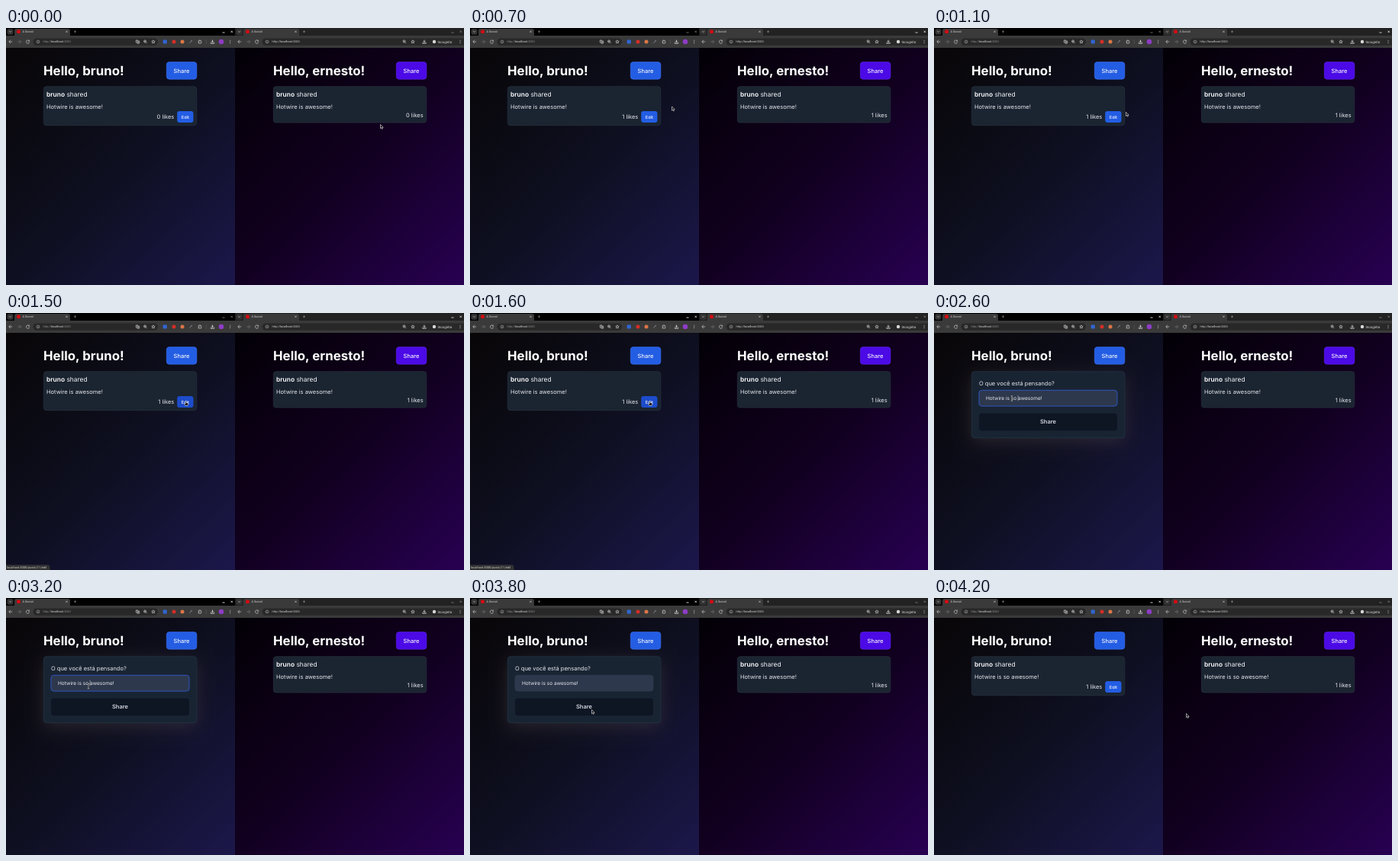
Animation of 600 by 337 pixels, one loop 4300 ms. Source, as an HTML page with a canvas:

```html
<!DOCTYPE html>
<html lang="en">
<head>
<meta charset="utf-8">
<title>Live feed in two windows</title>
<style>
html, body { margin: 0; width: 100%; height: 100%; overflow: hidden; background: #000; }
canvas { display: block; width: 600px; height: 337px; }
</style>
</head>
<body>
<canvas id="stage" width="600" height="337"></canvas>
<script>
const ctx = document.getElementById('stage').getContext('2d');
const LOOP = 4300;
const AUTHOR = 'bruno', READER = 'ernesto';
const T = { like: 300, hover: 1300, edit: 1600, form: 1700, focus: 2100, typing: 2300, blur: 3700, save: 3900 };

// Pointer path: time, x, y
const PATH = [
  [0, 490.5, 126.5], [200, 534, 115], [350, 534, 115], [700, 264.5, 103], [900, 264, 104],
  [1150, 250, 111], [1300, 235.5, 115.5], [1650, 235.5, 115.5], [2000, 102, 112],
  [3100, 102, 112], [3600, 159.5, 146.5], [3900, 159.5, 146.5], [4200, 330.5, 151.5]
];

ctx.textRendering = 'geometricPrecision';

function box(x, y, w, h, r, fill, line, width = 0.6) {
  ctx.beginPath();
  ctx.roundRect(x, y, w, h, r);
  if (fill) { ctx.fillStyle = fill; ctx.fill(); }
  if (line) { ctx.strokeStyle = line; ctx.lineWidth = width; ctx.stroke(); }
}

function dot(x, y, r, fill) {
  ctx.beginPath();
  ctx.arc(x, y, r, 0, Math.PI * 2);
  ctx.fillStyle = fill;
  ctx.fill();
}

function stroke(color, width, d, x = 0, y = 0) {
  ctx.save();
  ctx.translate(x, y);
  ctx.strokeStyle = color;
  ctx.lineWidth = width;
  ctx.stroke(new Path2D(d));
  ctx.restore();
}

// Returns the x where the text ends.
function text(str, x, y, size, color = '#f3f4f6', weight = 400, align = 'left', family = 'Inter') {
  ctx.font = `${weight} ${size}px ${family}, sans-serif`;
  ctx.textAlign = align;
  ctx.fillStyle = color;
  ctx.fillText(str, x, y);
  return x + ctx.measureText(str).width;
}

const small = (str, x, y, color, size = 3.9) => text(str, x, y, size, color, 400, 'left', 'Roboto');

const ICONS = {
  back: 'M2.2 0H-2.2M0 -2.2L-2.2 0L0 2.2',
  next: 'M-2.2 0H2.2M0 -2.2L2.2 0L0 2.2',
  reload: 'M1.7 -1.2A2.1 2.1 0 1 0 2.1 .5M2.1 -2.3V-.8H.6',
  info: 'M1.9 0A1.9 1.9 0 1 1 -1.9 0A1.9 1.9 0 1 1 1.9 0M0 -.3V1.1M0 -1.1V-.7',
  zoom: 'M1.2 -.5A1.6 1.6 0 1 1 -2 -.5A1.6 1.6 0 1 1 1.2 -.5M.8 .7L2.2 2.1M-1.2 -.5H.4M-.4 -1.3V.3',
  star: 'M0 -2.2L.6 -.7L2.2 -.6L1 .4L1.4 2L0 1.1L-1.4 2L-1 .4L-2.2 -.6L-.6 -.7Z',
  translate: 'M-2.2 -2H.3V1H-2.2ZM.3 -.8H2.2V2.2H-.6V1M-1.6 -1.1H-.3M.8 1.4L1.4 0',
  download: 'M0 -2.4V.8M-1.4 -.6L0 .8L1.4 -.6M-2.2 1V2.2H2.2V1',
  puzzle: 'M-1.9 -1.3H-.6V-2.1H.5V-1.3H1.7V2H-1.9V.9H-1.2V-.2H-1.9Z',
  pen: 'M-1.8 2L1.8 -2M.4 -1.7L1.7 -.6',
  close: 'M-1.1 -1.1L1.1 1.1M1.1 -1.1L-1.1 1.1',
  plus: 'M-1.6 0H1.6M0 -1.6V1.6',
  chevron: 'M-1.3 -.6L0 .7L1.3 -.6'
};

function icon(name, x, y, color = '#d2d2d2', width = 0.65) {
  stroke(color, width, ICONS[name], x, y);
}

function kebab(x) {
  for (const y of [16.2, 18, 19.8]) dot(x, y, 0.5, '#d0d0d0');
}

function chrome(ox, strip, active, pillEnd) {
  ctx.fillStyle = strip;
  ctx.fillRect(ox, 0, 300, 11);
  box(ox + 1.5, 1.2, 8, 7.5, 2, '#343434');
  icon('chevron', ox + 5.5, 4.8);
  box(ox + 11, 1, 73, 12, 2.5, '#3a3a3a');
  ctx.fillStyle = '#3a3a3a';
  ctx.fillRect(ox, 10, 300, 16);
  dot(ox + 16.5, 4.8, 2.5, '#d40b12');
  small('A Social', ox + 21.5, 6.2, '#dcdcdc');
  icon('close', ox + 79.5, 4.8);
  icon('plus', ox + 90.5, 4.8, '#b0b0b0', 0.5);
  const control = active ? '#f0f0f0' : '#858585';
  stroke(control, 0.8, 'M-1.6 0H1.6', ox + 285, 6);
  icon('close', ox + 295.7, 4.8, control, 0.8);

  icon('back', ox + 6, 18);
  icon('next', ox + 17.5, 18, '#777');
  icon('reload', ox + 28.5, 18);
  box(ox + 35.5, 13.4, pillEnd - 35.5, 9.4, 4.7, '#282828');
  icon('info', ox + 42, 18, '#c8c8c8', 0.5);
  const right = ox > 0;
  let x = small('http://', ox + 48.5, 19.4, right ? '#c8c8c8' : '#8c8c8c');
  x = small('localhost', x, 19.4, '#e2e2e2');
  small(':3000', x, 19.4, right ? '#c8c8c8' : '#8c8c8c');
}

function leftTools() {
  icon('translate', 172.5, 18);
  icon('zoom', 182.5, 18);
  icon('star', 193, 18);
  box(205.7, 15.5, 5, 5, 1, '#2f66d8');
  dot(220, 18, 2.5, '#d52e25');
  dot(231, 18, 2.5, '#d97746');
  icon('pen', 242, 18, '#999');
  icon('puzzle', 254, 18);
  stroke('#5a5a5a', 0.6, 'M262.3 15V21');
  icon('download', 270.5, 18, '#e6e6e6', 0.8);
  dot(282, 18, 3.3, '#8e3cc4');
  kebab(293.7);
}

function rightTools() {
  icon('zoom', 522, 18);
  icon('star', 533, 18);
  icon('download', 548, 18, '#e6e6e6', 0.8);
  box(556, 13.4, 33, 9.4, 4.7, '#292929');
  dot(561, 18, 2.2, '#d8d8d8');
  small('Incognito', 565.5, 19.5, '#e0e0e0', 4.5);
  kebab(595);
}

function backdrop(ox, colors) {
  const g = ctx.createLinearGradient(ox, 26, ox + 300, 337);
  colors.forEach((c, i) => g.addColorStop(i / (colors.length - 1), c));
  ctx.fillStyle = g;
  ctx.fillRect(ox, 26, 300, 311);
}

function header(ox, name, fill, line) {
  text(`Hello, ${name}!`, ox + 49, 62, 16.875, '#fff', 700);
  box(ox + 210.3, 44.6, 39.6, 22.6, 3.7, fill, line);
  text('Share', ox + 230, 58.7, 7.5, '#f4f5ff', 500, 'center');
}

function card(ox, height, message) {
  box(ox + 49.3, 76.7, 200.5, height, 3.7, '#1b2431', '#2d3744');
  const end = text(AUTHOR, ox + 53, 90, 8.44, '#fff', 600);
  text(' shared', end, 90, 8.44);
  text(message, ox + 53, 105.9, 7.5, '#e5e7eb');
}

function form(t, value, typed) {
  ctx.save();
  ctx.shadowColor = 'rgba(96, 84, 82, .34)';
  ctx.shadowBlur = 22;
  ctx.shadowOffsetY = 5;
  box(49.3, 76.7, 200.5, 87, 3.7, '#192433');
  ctx.restore();
  box(49.3, 76.7, 200.5, 87, 3.7, null, '#26394a');
  text('O que você está pensando?', 59, 94.6, 7.5, '#e5e7eb');

  const focused = t >= T.focus && t < T.blur;
  box(59, 101.3, 181, 20.8, 3.7, '#2d384c', focused ? '#2f55c0' : '#344156', focused ? 1 : 0.5);
  text(value, 68, 113.9, 6.56, '#e8eaef');
  if (focused && (t - T.focus) % 1000 < 600) {
    const caret = 68 + ctx.measureText('Hotwire is ' + typed).width;
    stroke('#e8eaef', 0.5, 'M0 108V115.2', caret);
  }
  box(59, 131.4, 181, 22.8, 3.7, '#0e1523');
  text('Share', 149.5, 145.3, 7.5, '#d5d9e0', 600, 'center');
}

function pointerAt(t) {
  const i = PATH.findIndex(p => p[0] > t);
  if (i < 0) return PATH[PATH.length - 1].slice(1);
  const [t0, x0, y0] = PATH[i - 1], [t1, x1, y1] = PATH[i];
  const u = (t - t0) / (t1 - t0), e = u * u * (3 - 2 * u);
  return [x0 + (x1 - x0) * e, y0 + (y1 - y0) * e];
}

const ARROW = new Path2D('M0 0V5.2L1.2 4.1L2 5.9L2.9 5.5L2.1 3.8H3.7Z');
const HAND = new Path2D('M-.5 0Q0 -.7 .5 0V2L3 2.7V4.4L2.2 6H-.5L-2 3.7Q-1.7 2.8 -.5 3.7Z');

function pointer(t) {
  const [x, y] = pointerAt(t);
  const overInput = t >= T.form && t < T.save && x > 59 && x < 240 && y > 101 && y < 122;
  const overLink = t >= T.hover && t < T.form;
  if (overInput) {
    const beam = 'M-1.2 -3.2H1.2M0 -3.2V3.2M-1.2 3.2H1.2';
    stroke('#111', 1.3, beam, x, y);
    stroke('#eee', 0.65, beam, x, y);
    return;
  }
  const shape = overLink ? HAND : ARROW;
  ctx.save();
  ctx.translate(x, y);
  ctx.fillStyle = '#080808';
  ctx.fill(shape);
  ctx.strokeStyle = '#f2f2f2';
  ctx.lineWidth = 0.6;
  ctx.stroke(shape);
  ctx.restore();
}

function draw(t) {
  const likes = `${t < T.like ? 0 : 1} likes`;
  const hovered = t >= T.hover && t < T.form;
  const editing = t >= T.form && t < T.save;
  const count = Math.max(0, Math.min(3, Math.floor((t - T.typing) / 100) + 1));
  const typed = 'so '.slice(0, count);
  const draft = `Hotwire is ${typed}awesome!`;
  const saved = `Hotwire is ${t < T.save ? '' : 'so '}awesome!`;
  const rightActive = t >= T.like && t < T.edit;

  backdrop(0, ['#080607', '#0e0f20', '#1c174b']);
  backdrop(300, ['#030006', '#11001f', '#280052']);
  chrome(0, '#000', !rightActive, 199);
  leftTools();
  chrome(300, '#222', rightActive, 540);
  rightTools();

  header(0, AUTHOR, '#235de4', '#3b72ec');
  if (editing) {
    form(t, draft, typed);
  } else {
    card(0, 51, saved);
    text(likes, 220.3, 118.9, 7.5, '#e5e7eb', 400, 'right');
    box(224.2, 109, 21.3, 15, 3.2, hovered ? '#1d4ccb' : '#235de4');
    text('Edit', 234.9, 118.5, 5.6, '#f4f5ff', 500, 'center');
  }

  header(301, READER, '#4b0ae6', '#6226e6');
  card(301, 47.4, saved);
  text(likes, 546.7, 116.9, 7.5, '#e5e7eb', 400, 'right');

  if (hovered) {
    box(-2, 330.7, 59, 9, 2, '#303030', '#444');
    small('localhost:3000/posts/11/edit', 1, 335.2, '#d0d0d0', 4);
  }
  pointer(t);
}

function tick(now) {
  const t = now % LOOP;
  draw(Math.floor(t / 100) * 100);
  requestAnimationFrame(tick);
}
draw(0);
requestAnimationFrame(tick);
</script>
</body>
</html>
```
